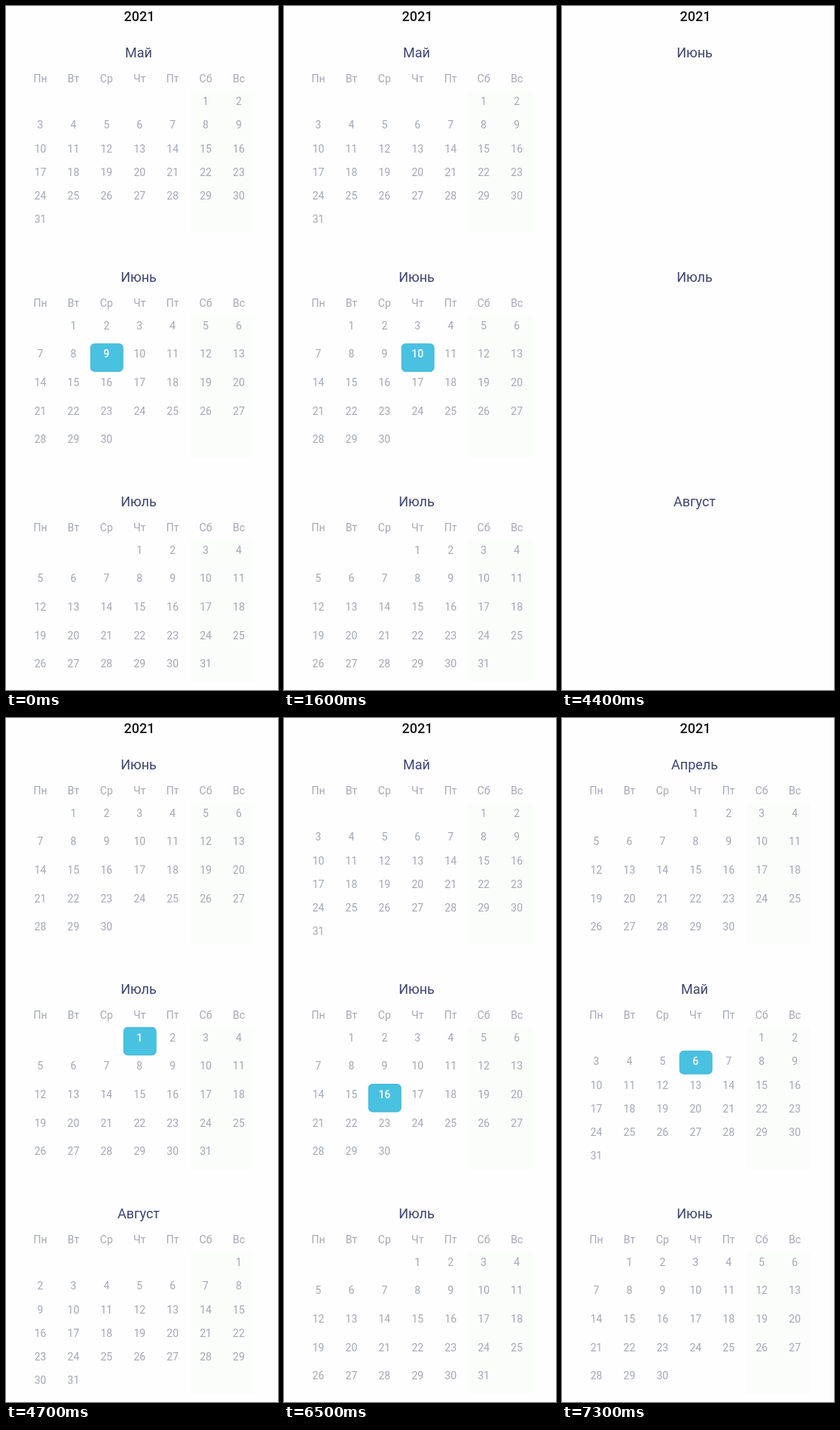
An HTML page that plays this animation: 361 px wide and 905 px high, repeating every 8600 ms.

```html
<!DOCTYPE html>
<html lang="ru">
<head>
<meta charset="utf-8">
<title>2021</title>
<style>
  html, body { margin: 0; width: 100%; height: 100%; overflow: hidden; background: #fefefe; }
  svg { display: block; font: 14px Roboto, sans-serif; text-anchor: middle; fill: #a3a7b7; }
  .year { font-size: 18px; font-weight: 500; fill: #171717; }
  .title { font-size: 18px; fill: #3c446f; }
  .shade { fill: #fbfdfb; }
  .pick { fill: #49c1e0; stroke: #40b4d3; }
  .picked { fill: #fff; font-weight: 500; }
</style>
</head>
<body>
<svg id="stage" width="361" height="905"></svg>
<script>
const YEAR = 2021, LOOP = 8600;
const MONTHS = ['Январь', 'Февраль', 'Март', 'Апрель', 'Май', 'Июнь', 'Июль', 'Август'];
const WEEKDAYS = ['Пн', 'Вт', 'Ср', 'Чт', 'Пт', 'Сб', 'Вс'];
const LEFT = 23.6, COL = 43.9, TOP = 111.9, HEIGHT = 187.8, PITCH = 297;

// The middle month holds the picked day; day 0 means the grids are still loading.
const STEPS = [
  { at: 0, month: 5, day: 9 },
  { at: 1600, month: 5, day: 10 },
  { at: 3100, month: 5, day: 23 },
  { at: 4400, month: 6, day: 0 },
  { at: 4700, month: 6, day: 1 },
  { at: 6000, month: 5, day: 0 },
  { at: 6500, month: 5, day: 16 },
  { at: 7300, month: 4, day: 6 }
];

const stage = document.getElementById('stage');
const text = (x, y, s, cls = '') => `<text x="${x}" y="${Math.round(y)}" class="${cls}">${s}</text>`;
const rect = (x, y, w, h, cls, r = 0) =>
  `<rect x="${x}" y="${y}" width="${w}" height="${h}" rx="${r}" class="${cls}"/>`;
const center = col => LEFT + COL * (col + 0.5);

function grid(month, y, picked) {
  const offset = (new Date(YEAR, month, 1).getDay() + 6) % 7;
  const days = new Date(YEAR, month + 1, 0).getDate();
  const row = HEIGHT / Math.ceil((offset + days) / 7);
  const top = TOP + y;
  let out = rect(244.5, top, 86, HEIGHT, 'shade');
  WEEKDAYS.forEach((name, col) => out += text(center(col), y + 101, name));
  for (let day = 1; day <= days; day++) {
    const cell = offset + day - 1, col = cell % 7;
    const cellTop = top + row * Math.floor(cell / 7);
    const on = day === picked;
    if (on) out += rect(LEFT + COL * col + 0.9, cellTop + 0.5, COL - 1, row - 1, 'pick', 5);
    out += text(center(col), cellTop + 19, day, on ? 'picked' : '');
  }
  return out;
}

function draw({ month, day }) {
  let out = '<rect x="355" width="6" height="905" fill="#fcfcfc"/>' + text(177, 20, YEAR, 'year');
  for (let i = 0; i < 3; i++) {
    const m = month - 1 + i, y = i * PITCH;
    out += text(176, y + 68, MONTHS[m], 'title');
    if (day) out += grid(m, y, i === 1 ? day : 0);
  }
  stage.innerHTML = out;
}

let shown;
function tick() {
  const t = performance.now() % LOOP;
  const step = STEPS.findLast(s => s.at <= t);
  if (step !== shown) draw(shown = step);
  requestAnimationFrame(tick);
}
tick();
</script>
</body>
</html>
```
